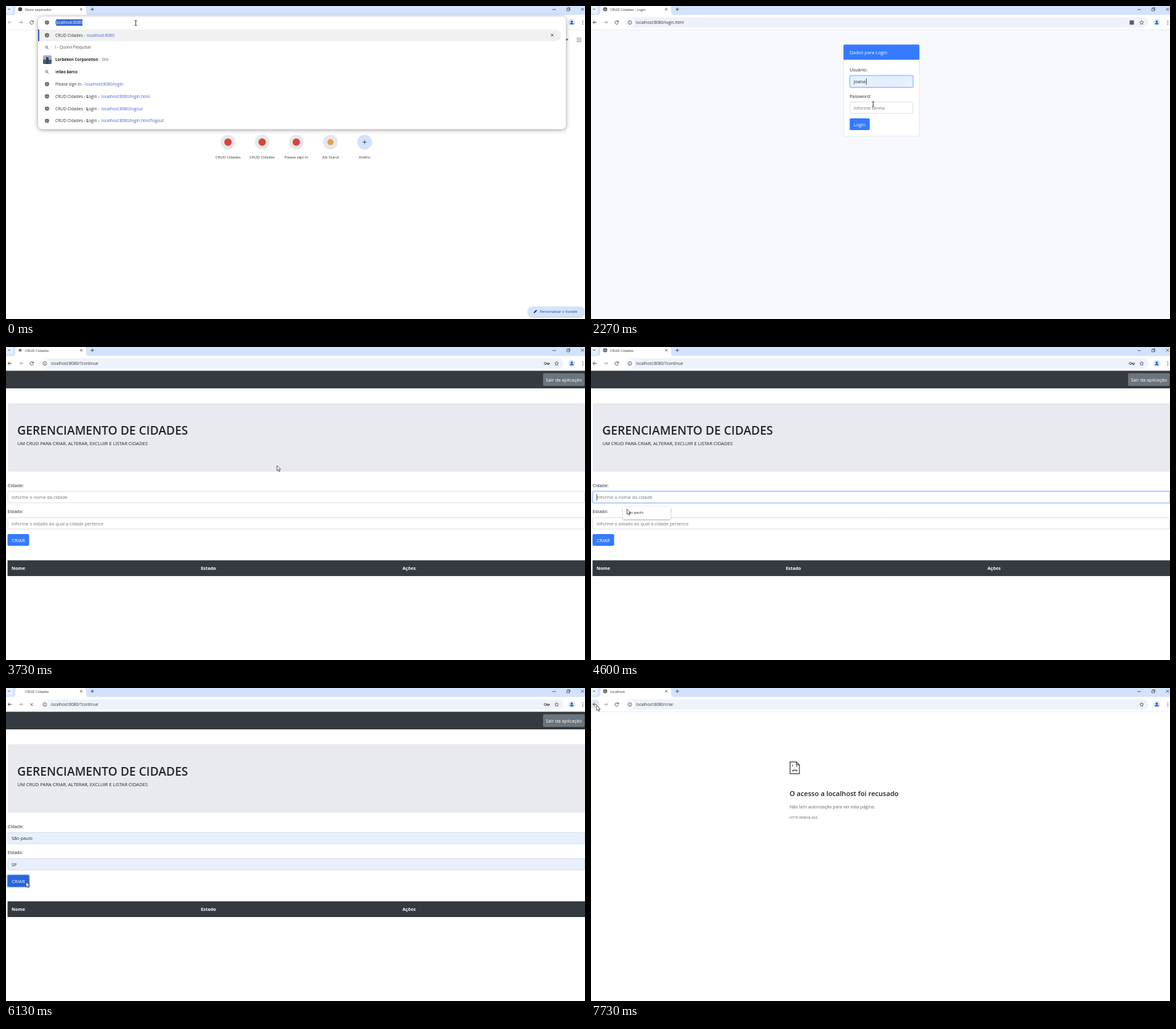
These frames come from a looping animation (939x507 px, 8000 ms). An HTML page with a canvas:

```html
<!DOCTYPE html>
<html lang="pt">
<head>
<meta charset="utf-8">
<style>
html, body { margin: 0; width: 100%; height: 100%; overflow: hidden; background: #fff; }
canvas { display: block; }
</style>
</head>
<body>
<canvas id="stage" width="939" height="507"></canvas>
<script>
const ctx = document.getElementById('stage').getContext('2d');
const LOOP = 8000;
const BLUE = '#357aff', DARK = '#343a40', INK = '#212529', MUTED = '#6c757d', ICON = '#44474c';
const LINK = '#3c67c8', SKY = '#d3e3fd', FILLED = '#e8f0fe';

// Pointer stops: time, x, y; the pointer eases from one to the next
const STOPS = [
  [730, 210.5, 27.5], [1130, 173.5, 54], [1680, 440, 122], [1800, 440, 122],
  [2060, 455, 149], [2270, 457.5, 159], [2670, 453, 172], [3270, 453, 172],
  [3500, 438, 191], [3730, 439.5, 192], [3850, 439.5, 192], [4300, 52, 243],
  [4420, 52, 243], [4680, 60, 268], [5000, 58, 268], [5230, 53, 282],
  [5330, 53, 282], [5560, 60, 310], [5640, 60, 310], [5860, 32.5, 314],
  [6930, 32.5, 314], [7130, 3, 65], [7270, 3, 65], [7400, 6, 9], [7530, 9, 28]
];

const clamp = v => Math.max(0, Math.min(1, v));
const between = (t, from, to) => t >= from && t < to;
const focusLevel = (t, from, to) => Math.min(clamp((t - from) / 150), clamp(1 - (t - to) / 150));

function pointerAt(t) {
  const i = STOPS.findIndex(s => s[0] > t);
  if (i < 1) return i ? STOPS[STOPS.length - 1].slice(1) : STOPS[0].slice(1);
  const [t0, x0, y0] = STOPS[i - 1], [t1, x1, y1] = STOPS[i];
  const u = (t - t0) / (t1 - t0), k = u * u * (3 - 2 * u);
  return [x0 + (x1 - x0) * k, y0 + (y1 - y0) * k];
}

// y is the middle of the capitals
function text(str, x, y, size, color = INK, weight = 400, align = 'left') {
  ctx.font = `${weight} ${size}px "Open Sans", "Noto Sans", sans-serif`;
  ctx.textAlign = align;
  ctx.fillStyle = color;
  ctx.fillText(str, x, y + size * 0.357);
  return x + ctx.measureText(str).width;
}

function box(x, y, w, h, r, fill, stroke, line = 1) {
  ctx.beginPath();
  ctx.roundRect(x, y, w, h, r);
  if (fill) { ctx.fillStyle = fill; ctx.fill(); }
  if (stroke) { ctx.strokeStyle = stroke; ctx.lineWidth = line; ctx.stroke(); }
}

function raised(x, y, w, h, r, fill, blur = 4, alpha = 0.35) {
  ctx.save();
  ctx.shadowColor = `rgba(0,0,0,${alpha})`;
  ctx.shadowBlur = blur;
  ctx.shadowOffsetY = 1;
  box(x, y, w, h, r, fill);
  ctx.restore();
}

function disc(x, y, r, fill) {
  ctx.beginPath();
  ctx.arc(x, y, r, 0, 7);
  ctx.fillStyle = fill;
  ctx.fill();
}

function path(d, x, y, stroke, line = 1, fill) {
  const p = new Path2D(d);
  ctx.save();
  ctx.translate(x, y);
  if (fill) { ctx.fillStyle = fill; ctx.fill(p); }
  if (stroke) { ctx.strokeStyle = stroke; ctx.lineWidth = line; ctx.stroke(p); }
  ctx.restore();
}

const cross = (x, y, r = 2, color = ICON) =>
  path(`M${-r} ${-r}L${r} ${r}M${r} ${-r}L${-r} ${r}`, x, y, color, 0.9);
const plus = (x, y, r = 2.7) => path(`M${-r} 0H${r}M0 ${-r}V${r}`, x, y, ICON, 1);
const dots = (x, y) => [-2.7, 0, 2.7].forEach(d => disc(x, y + d, 0.75, ICON));

function globe(x, y, r = 3.3) {
  disc(x, y, r, ICON);
  ctx.save();
  ctx.translate(x, y);
  ctx.scale(r / 3.3, r / 3.3);
  path('M-2.5 -.6L-.6 1L-.8 2.5M.2 -2.6L.4 -1.2L-1 -.4M2.5 .2L.8 .2L1.2 1.6', 0, 0, '#fff', 0.75);
  ctx.restore();
}

function magnifier(x, y) {
  path('M1.1 -.7A1.8 1.8 0 1 1 -2.5 -.7A1.8 1.8 0 1 1 1.1 -.7M.7 .6L2.8 2.7', x, y, ICON, 0.8);
}

function keyIcon(x, y) {
  path('M-.6 0A1.8 1.8 0 1 1 -4.2 0A1.8 1.8 0 1 1 -.6 0M-.6 -.5H4.4V.6H3.4V2H1.8V.6H-.6', x, y, ICON, 1);
}

function browserBar(title, url, opts = {}) {
  box(0, 0, 939, 15, 0, SKY);
  box(-3, -3, 14, 15, 4, '#e9f1fe');
  path('M-1.8 -.8L0 1L1.8 -.8', 5, 5, ICON, 1);
  path('M10 15Q15 15 15 10V4Q15 0 19 0H126Q130 0 130 4V10Q130 15 135 15Z', 0, 0, null, 0, '#fff');
  box(0, 14.5, 939, 24, 0, '#fff');
  if (opts.icon) opts.icon();
  text(title, 31, 5.5, 5.75, '#303134');
  cross(122, 5.3, 1.8);
  plus(140, 5.3);
  path('M-2.8 0H2.8', 889, 5.8, ICON, 0.9);
  path('M-2.5 -1.2H1.4V2.6H-2.5ZM-1.2 -1.2V-2.5H2.6V1.4H1.4', 912, 5.3, ICON, 0.8);
  cross(935, 5.3, 2.4);

  if (opts.backHover) disc(6, 26.5, 8, '#e6e7ea');
  const arrow = 'M3 0H-2.8M0 -2.8L-2.8 0L0 2.8';
  path(arrow, 6, 26.5, opts.noBack ? '#b5b7ba' : ICON);
  ctx.save();
  ctx.scale(-1, 1);
  path(arrow, -24, 26.5, '#a3a5a9');
  ctx.restore();
  if (opts.loading) cross(41.5, 26.7, 2.2);
  else path('M2.5 -1.2A2.8 2.8 0 1 0 2.7 .8M2.8 -3.2V-.9H.5', 41.7, 26.7, ICON, 0.9);

  if (url) {
    box(55, 18.5, 849, 16.5, 8.25, '#eef2fa');
    box(55.5, 19, 15.5, 15.5, 7.75, '#f8fafd');
    path('M3 0A3 3 0 1 1 -3 0A3 3 0 1 1 3 0M0 -.4V1.7M0 -1.8V-1', 63, 26.7, ICON, 0.8);
    text(url, 73, 26.7, 6.58, '#35373b');
    path('M0 -3.2L.95 -1.1L3.2 -.9L1.5 .7L2 2.9L0 1.8L-2 2.9L-1.5 .7L-3.2 -.9L-.95 -1.1Z', 893, 26.7, ICON, 0.75);
  }
  disc(917.5, 26.5, 5.4, SKY);
  disc(917.5, 25.2, 1.6, '#1b4fb5');
  path('M-3 0Q-3 -2.2 0 -2.2T3 0Z', 917.5, 29.4, null, 0, '#1b4fb5');
  dots(935.5, 26.7);
  box(0, 38, 939, 0.8, 0, '#e4e8ee');
}

function newTabPage() {
  browserBar('Novo separador', '', { noBack: true, icon: () => disc(23, 5.3, 3.3, ICON) });
  for (let i = 0; i < 9; i++) box(925.8 + i % 3 * 2.7, 51.5 + Math.floor(i / 3) * 2.7, 1.6, 1.6, 0.4, '#5f6368');
  box(903, 52.8, 8.5, 3, 0.5, '#8b8d90');

  raised(52, 17, 856, 182.5, 7, '#fff', 7, 0.42);
  globe(66.5, 26.7);
  text('l', 80, 26.7, 6.6);
  box(81.3, 21.5, 42.7, 10.5, 0, '#3568d2');
  text('ocalhost:8080', 81.6, 26.7, 6.55, '#fff');

  box(52, 38, 848, 19, [0, 9, 9, 0], '#f1f1f2');
  box(52, 38, 2, 19, [0, 1, 1, 0], '#2f59c6');
  cross(885.7, 47.3, 2.2, '#222');
  const rowY = i => 47.4 + i * 19.8;
  [0, 4, 5, 6, 7].forEach(i => globe(66.5, rowY(i)));
  [1, 3].forEach(i => magnifier(66.5, rowY(i)));

  box(60, 80, 14, 14, 2, '#9db0c4');
  box(60, 87, 14, 7, [0, 0, 2, 2], '#4b5a6e');
  box(65, 83, 4, 11, 0, '#31435f');

  const line = (i, str, link, x) => {
    text(str, 80, rowY(i), 6.7, '#303134');
    text(link, x, rowY(i), 6.63, LINK);
  };
  line(0, 'CRUD Cidades - ', 'localhost:8080', 131);
  text('l - Quorvi Pesquisar', 80, rowY(1), 6.4, '#4a4c50');
  const nameEnd = text('Lorbeken Corporation', 80, rowY(2), 6.35, '#222', 700);
  text(' - Site', nameEnd, rowY(2), 6.5, '#5f6368');
  const first = text('l', 80, rowY(3), 6.4, '#303134');
  text('eilao barco', first, rowY(3), 6.25, '#222', 700);
  line(4, 'Please sign in - ', 'localhost:8080/login', 128);
  ['login.html', 'logout', 'login.html?logout'].forEach((page, i) => {
    const x = text('CRUD Cidades - ', 80, rowY(5 + i), 6.7, '#303134');
    const end = text('L', x, rowY(5 + i), 6.7, '#222', 700);
    text('ogin -', end, rowY(5 + i), 6.7, '#303134');
    text('localhost:8080/' + page, 155, rowY(5 + i), 6.63, LINK);
  });

  ['CRUD Cidades', 'CRUD Cidades', 'Please sign in', 'Zib Stand', 'Atalho'].forEach((label, i) => {
    const x = 360 + i * 55.4;
    disc(x, 220.5, 12, i < 4 ? '#e7e8eb' : SKY);
    if (i < 4) disc(x, 220.5, i < 3 ? 6 : 5, i < 3 ? '#dc4238' : '#e4a04f');
    else plus(x, 220.5, 3.2);
    text(label, x, 244.8, 6.15, '#303134', 400, 'center');
  });

  raised(846.5, 487, 91.5, 16, 8, SKY, 3, 0.3);
  path('M-2.8 2.8L-2.4 1L1.3 -2.7L2.7 -1.3L-1 2.4Z', 858.5, 494.8, null, 0, '#173a78');
  text('Personalizar o Vondle', 866, 494.8, 6, '#173a78', 500);
}

function input(x, y, w, h, value, placeholder, focus, filled) {
  if (focus > 0) {
    ctx.globalAlpha = focus;
    box(x - 1, y - 1, w + 2, h + 2, 3, '#c0d8ff');
    ctx.globalAlpha = 1;
  }
  box(x + 0.5, y + 0.5, w - 1, h - 1, 2, filled ? FILLED : '#fff', focus > 0.4 ? '#8db8fb' : '#cfd5de', 0.8);
  text(value || placeholder, x + 6.5, y + h / 2 + 0.4, 7.35, value ? INK : MUTED);
}

const caret = (x, y) => box(x, y - 5, 0.8, 10, 0, '#222');

function suggestion(str, x, y) {
  raised(x, y, 77, 20.5, 2, '#fff', 3, 0.35);
  text(str, x + 5.8, y + 9.8, 5.9, '#222');
}

function loginPage(t) {
  box(0, 38, 939, 469, 0, '#f8f9fe');
  browserBar('CRUD Cidades - Login', 'localhost:8080/login.html', { icon: () => globe(23, 5.3) });
  const popup = between(t, 1000, 1700);
  if (popup) disc(877, 26.7, 7, '#d9dde5');
  box(873.5, 23.2, 7, 7, 1, '#5b6069');
  if (t >= 3130) keyIcon(861, 26.7);

  box(409.7, 63, 122.6, 148, 2, '#fff', '#dfe1e6', 0.8);
  box(409.5, 62.5, 123, 24.5, [2, 2, 0, 0], BLUE);
  text('Dados para Login', 419.5, 75, 7.5, '#fff');
  text('Usuário:', 419.5, 103.2, 7.35);
  text('Password:', 419.5, 146, 7.25);

  const named = t >= 2100, typed = Math.max(0, Math.min(5, Math.floor((t - 3130) / 60) + 1));
  input(419.5, 112.5, 103, 19.5, named ? 'Joana' : '', 'Informe usuário', focusLevel(t, 1700, 2330), named);
  input(419.5, 155, 103, 19.5, '•'.repeat(typed), 'Informe senha', focusLevel(t, 2330, 3500), false);
  if (between(t, 1700, 2100)) caret(426, 122.5);
  if (between(t, 2100, 2400)) caret(446, 122.5);
  if (between(t, 2400, 2930)) caret(426, 165);

  box(419.5, 182, 32.5, 19, 2, t >= 3450 ? '#2866db' : BLUE);
  text('Login', 435.7, 191.8, 7.6, '#fff', 400, 'center');
  if (between(t, 1780, 2100)) suggestion('Joana', 440, 138);

  if (popup) {
    raised(735, 37, 169, 41.5, 5, '#fff', 4, 0.4);
    box(735, 58, 169, 20.5, [0, 0, 5, 5], '#f1f1f2');
    text('espanhol', 772, 47, 5.65, '#2b5fcb', 700, 'center');
    text('português', 831.7, 47, 5.7, '#3c4043', 700, 'center');
    box(743, 53.3, 119, 0.7, 0, '#e0e3e8');
    box(743, 52.8, 58, 1.3, 0, '#2b5fcb');
    dots(872.5, 47);
    cross(889, 47, 2.3);
    text('Quorvi Interpret', 745, 67.8, 5.75, '#5f6368');
  }
}

function cityPage(t) {
  const loading = t >= 5980;
  browserBar('CRUD Cidades', 'localhost:8080/?continue', {
    loading,
    icon: () => loading || globe(23, 5.3, t < 3800 ? 2.2 : 3.3)
  });
  keyIcon(877, 26.7);

  box(0, 38.5, 939, 28.5, 0, DARK);
  box(871, 42.5, 67.5, 20.5, 2, MUTED);
  text('Sair da aplicação', 904.7, 53.2, 7.5, '#fff', 400, 'center');
  box(3, 91, 936, 111, 3, '#e9eaef');
  text('GERENCIAMENTO DE CIDADES', 18.3, 135.5, 19.2, INK, 600);
  text('UM CRUD PARA CRIAR, ALTERAR, EXCLUIR E LISTAR CIDADES', 18.5, 156.7, 7.6);

  const city = t >= 4720, state = t >= 5600;
  text('Cidade:', 2.7, 224.2, 7.4);
  input(2.5, 233.5, 936.5, 19.3, city ? 'São paulo' : '', 'Informe o nome da cidade', focusLevel(t, 4330, 5250), city);
  text('Estado:', 2.7, 266.8, 7.4);
  input(2.5, 276, 936.5, 19.3, state ? 'SP' : '', 'Informe o estado ao qual a cidade pertence', focusLevel(t, 5250, 5920), state);
  if (between(t, 4330, 4720)) caret(9, 243.5);
  if (between(t, 4720, 5230)) caret(44.5, 243.5);
  if (between(t, 5230, 5600)) caret(9, 286);
  if (between(t, 5600, 5900)) caret(18.5, 286);

  if (t >= 5920) box(1, 301.5, 38, 22, 3, '#a9c9ff');
  box(2.5, 303, 35, 19, 2, t >= 5830 ? '#2866db' : BLUE);
  text('CRIAR', 20, 312.8, 7.75, '#fff', 400, 'center');

  box(2.5, 345.5, 936.5, 25.5, 0, DARK);
  [['Nome', 9], ['Estado', 316], ['Ações', 643]].forEach(([label, x]) => text(label, x, 358.5, 7.35, '#fff', 700));
  if (between(t, 4400, 4720)) suggestion('São paulo', 52, 258.5);
  if (between(t, 5250, 5600)) suggestion('SP', 52, 301);
}

function errorPage(t) {
  browserBar('localhost', 'localhost:8080/criar', { backHover: t >= 7470, icon: () => globe(23, 5.3) });
  path('M.8 .8H11.2L16 5.6V19.8H.8ZM11.2 .8V5.6H16', 322, 119, '#55585c', 1.5);
  path('M4.8 5V8M11.6 7V9M4.6 16.2V15.2H6V14H10.8V15.2H12.2V16.2', 322, 119, '#55585c', 1.3);
  text('O acesso a localhost foi recusado', 322, 171.3, 11.1, '#202124', 600);
  text('Não tem autorização para ver esta página.', 322, 192, 7.05, '#5f6368');
  text('HTTP ERROR 403', 322, 210, 5.75, '#5f6368');
}

function pointer(t) {
  const [x, y] = pointerAt(t);
  const beam = t < 800 || between(t, 1650, 1850) || between(t, 2230, 3350) ||
    between(t, 4240, 4500) || between(t, 5180, 5400);
  if (beam) path('M-1.8 -4H-.4L0 -3.6L.4 -4H1.8M0 -3.6V3.6M-1.8 4H-.4L0 3.6L.4 4H1.8', x, y, '#222', 0.9);
  else path('M0 0V8.6L2 6.8L3.4 9.8L4.8 9.1L3.4 6.2H6Z', x, y, '#333', 0.8, '#fff');
}

function draw(now) {
  const t = now % LOOP;
  ctx.fillStyle = '#fff';
  ctx.fillRect(0, 0, 939, 507);
  const page = t < 800 ? newTabPage : t < 3600 ? loginPage : t < 6200 ? cityPage : errorPage;
  page(t);
  pointer(t);
  requestAnimationFrame(draw);
}
requestAnimationFrame(draw);
</script>
</body>
</html>
```
